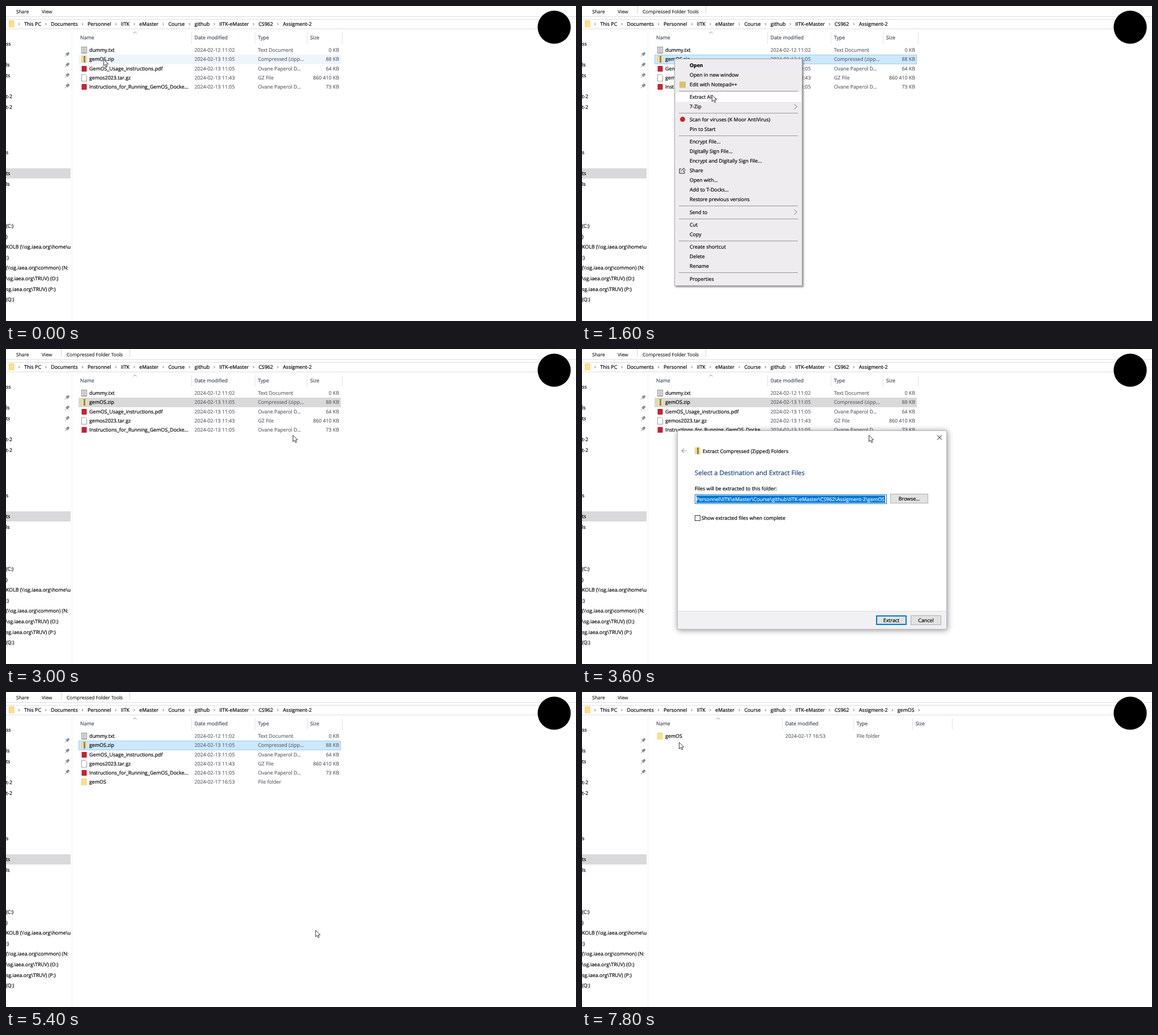
Write an HTML page with a canvas that moves like this. It is 1006x557 px and loops after 8 s.

```html
<!DOCTYPE html>
<html lang="en">
<head>
<meta charset="utf-8">
<title>Extracting an archive</title>
<style>
html, body { margin: 0; width: 100%; height: 100%; overflow: hidden; background: #fff; }
canvas { display: block; }
</style>
</head>
<body>
<canvas id="stage" width="1006" height="557"></canvas>
<script>
const ctx = document.getElementById('stage').getContext('2d');
const LOOP = 8000, STEP = 200;
const INK = '#000', GREY = '#66666c', BLUE = '#0078d7';

// When things happen, in ms
const T = {
  rightClick: 600, menu: 800, extractAll: 1800, menuGone: 2000, blur: 3000, dialog: 3600, dropped: 4000,
  extract: 4800, dialogGone: 5200, folderAdded: 5400, subfolder: 6000, open: 7000, selected: 7200, inside: 7400
};
const during = (t, start, end) => t >= start && t < end;

function text(str, x, y, { color = INK, size = 8.85, align = 'left', weight = 400 } = {}) {
  ctx.font = `${weight} ${size}px "Open Sans", "Noto Sans", sans-serif`;
  ctx.textRendering = 'geometricPrecision';
  ctx.textAlign = align;
  ctx.fillStyle = ctx.strokeStyle = color;
  ctx.lineWidth = 0.2;
  ctx.fillText(str, x, y + size * 0.36);
  ctx.strokeText(str, x, y + size * 0.36);
  return ctx.measureText(str).width;
}

function box(x, y, w, h, fill, stroke, width = 1) {
  if (fill) { ctx.fillStyle = fill; ctx.fillRect(x, y, w, h); }
  if (stroke) {
    ctx.strokeStyle = stroke;
    ctx.lineWidth = width;
    ctx.strokeRect(x + width / 2, y + width / 2, w - width, h - width);
  }
}

const hline = (x, y, w, color) => box(x, y, w, 1, color);
const vline = (x, y, h, color) => box(x, y, 1, h, color);

// Polyline through a flat list of coordinates, relative to (x, y)
function line(x, y, pts, color, width = 1, fill) {
  ctx.beginPath();
  for (let i = 0; i < pts.length; i += 2) ctx.lineTo(x + pts[i], y + pts[i + 1]);
  if (fill) { ctx.closePath(); ctx.fillStyle = fill; ctx.fill(); }
  ctx.strokeStyle = color;
  ctx.lineWidth = width;
  ctx.stroke();
}

function disc(x, y, r, color) {
  ctx.beginPath();
  ctx.arc(x, y, r, 0, 2 * Math.PI);
  ctx.fillStyle = color;
  ctx.fill();
}

function shadowBox(x, y, w, h, fill, stroke, blur, offset) {
  ctx.save();
  ctx.shadowColor = 'rgba(0,0,0,.45)';
  ctx.shadowBlur = blur;
  ctx.shadowOffsetX = ctx.shadowOffsetY = offset;
  box(x, y, w, h, fill);
  ctx.restore();
  box(x, y, w, h, null, stroke);
}

function clipped(x, y, w, h, paint) {
  ctx.save();
  ctx.beginPath();
  ctx.rect(x, y, w, h);
  ctx.clip();
  paint();
  ctx.restore();
}

function chevron(x, y, s = 2, color = '#5c5c60') {
  line(x, y, [-s / 2, -s, s / 2, 0, -s / 2, s], color, 0.9);
}

// Small icons, centred on (x, y)
const icons = {
  page(x, y) { line(x, y, [-4.5, -6, 1.5, -6, 4.5, -3, 4.5, 6, -4.5, 6], '#8e8e92', 0.9, '#fff'); },
  text(x, y) {
    box(x - 5, y - 6, 10, 12, '#f0f0f0', '#8b8b8e');
    for (let i = -4; i <= 4; i += 2) hline(x - 3, y + i, 6, '#a5a5aa');
  },
  folder(x, y) {
    box(x - 5, y - 6, 9, 12, '#f3cf6b');
    box(x - 4, y - 5, 9, 11, '#fbdf8c');
  },
  zip(x, y) {
    icons.folder(x, y);
    box(x - 1, y - 6, 3, 12, '#a8a08a');
    for (let i = -5; i < 6; i += 2) hline(x - 1, y + i, 3, '#6d695e');
  },
  pdf(x, y) { box(x - 4.5, y - 5, 9, 10, '#c8202f'); },
  pin(x, y) {
    line(x, y, [-4, 4, 0, 0], '#858a90');
    line(x, y, [-2.5, -1.5, 1.5, 2.5], '#858a90', 1.5);
    line(x, y, [0, 0, 3, -3], '#858a90', 4);
  }
};

const ROW = 18.57;
const quickAccess = ['ss', '', 'ls', 'ts', '', 't-2', 't-2'];
const places = [
  's', '', 'ts', 'ls', '', '', '', '(C:)', ')', 'KOLB (\\\\sg.iaea.org\\home\\us', ':)',
  '(\\\\sg.iaea.org\\common) (N:', '\\sg.iaea.org\\TRUV) (O:)', 'sg.iaea.org\\TRUV) (P:)', '(Q:)'
];

function drawSidebar() {
  box(0, 287, 114, 18, '#d9d9db');
  vline(116, 44, 513, '#f1f1f1');
  clipped(0, 44, 114, 513, () => {
    quickAccess.forEach((str, i) => text(str, 0, 67 + i * ROW));
    places.forEach((str, i) => text(str, 0, 259 + i * ROW));
  });
  for (let i = 1; i <= 4; i++) icons.pin(108, 67 + i * ROW);
}

const crumbs = 'This PC/Documents/Personnel/IITK/eMaster/Course/github/IITK-eMaster/CS962/Assigment-2'.split('/');

function drawTop(t) {
  const tab = { size: 8.45, color: '#28282c' };
  text('Share', 18, 9.5, tab);
  text('View', 63, 9.5, tab);
  if (during(t, T.rightClick, T.selected)) {
    text('Compressed Folder Tools', 107, 9.5, tab);
    vline(97, 0, 14, '#d5d5d8');
    vline(218, 0, 14, '#d5d5d8');
  }
  hline(0, 18, 1006, '#dededf');
  box(-1, 23, 990, 18, '#fff', '#dcdcde');
  icons.folder(10, 31.5);

  let x = 32;
  chevron(x - 9, 32);
  const trail = t >= T.inside ? [...crumbs, 'gemOS'] : crumbs;
  trail.forEach((str, i) => {
    x += text(str, x, 31.5) + 17.3;
    if (i < trail.length - 1 || t >= T.subfolder) chevron(x - 9, 32);
  });
}

const PDF_TYPE = 'Ovane Paperol D...';
const ZIPPED = '2024-02-13 11:05';
const files = [
  ['text', 'dummy.txt', '2024-02-12 11:02', 'Text Document', '0 KB'],
  ['zip', 'gemOS.zip', ZIPPED, 'Compressed (zipp...', '88 KB'],
  ['pdf', 'GemOS_Usage_instructions.pdf', ZIPPED, PDF_TYPE, '64 KB'],
  ['page', 'gemos2023.tar.gz', '2024-02-13 11:43', 'GZ File', '860 410 KB'],
  ['pdf', 'Instructions_for_Running_GemOS_Docke...', ZIPPED, PDF_TYPE, '73 KB'],
  ['folder', 'gemOS', '2024-02-17 16:53', 'File folder', '']
];
const fileY = i => 78 + i * 16.25;

function drawTable(rows, edges) {
  const columns = [131, ...edges.map(x => x + 5.7)];
  ['Name', 'Date modified', 'Type', 'Size'].forEach((str, i) =>
    text(str, columns[i], 56, { color: '#444b5e' }));
  edges.forEach(x => vline(x, 46, 21, '#e3e3e6'));
  line(128 + (edges[0] - 128) / 2, 47, [-3, 1.5, 0, -1.5, 3, 1.5], '#7c7c80', 0.9);

  rows.forEach(([icon, name, date, type, size], i) => {
    const y = fileY(i);
    icons[icon](138, Math.round(y));
    text(name, 147, y);
    text(date, columns[1], y, { color: GREY });
    text(type, columns[2], y, { color: GREY });
    text(size, 588, y, { color: GREY, align: 'right' });
  });
}

function drawFiles(t) {
  if (t >= T.inside) return drawTable(files.slice(5), [353, 479, 583, 653]);

  const mark = (i, fill, edge) => box(128, Math.round(fileY(i)) - 8, 463, 17, fill, edge);
  const select = i => mark(i, '#cce8ff', '#99cdf5');
  if (t < T.rightClick) mark(1, '#eef5fd');
  else if (during(t, T.blur, T.dialogGone)) mark(1, '#d9d9d9');
  else select(t < T.selected ? 1 : 5);
  if (during(t, T.open, T.selected)) mark(5, '#e5f3ff');
  drawTable(files.slice(0, t >= T.folderAdded ? 6 : 5), [327, 439, 531, 593]);
}

const menu = [
  ['Open', 'Open in new window', 'Edit with Notepad++'],
  ['Extract All...', '7-Zip'],
  ['Scan for viruses (K Moor AntiVirus)', 'Pin to Start'],
  ['Encrypt File...', 'Digitally Sign File...', 'Encrypt and Digitally Sign File...', 'Share',
    'Open with...', 'Add to T-Docks...', 'Restore previous versions'],
  ['Send to'],
  ['Cut', 'Copy'],
  ['Create shortcut', 'Delete', 'Rename'],
  ['Properties']
];
const menuIcons = {
  'Edit with Notepad++': y => box(172, y - 5, 11, 11, '#d9c36a'),
  'Scan for viruses (K Moor AntiVirus)': y => disc(177.5, y, 4.5, '#d01f2e'),
  'Share': y => {
    line(177, y, [-2, -3, -5, -3, -5, 5, 4, 5, 4, 2], INK, 0.9);
    line(177, y, [-2.5, 2, 0, -2, 2, -2, 2, -4.5, 5.5, -1, 2, 2, 2, 0], INK, 0.8);
  },
  '7-Zip': y => chevron(377, y, 4.5),
  'Send to': y => chevron(377, y, 4.5)
};

function drawMenu(pointer) {
  const pitch = 17.05, gap = 5.3;
  shadowBox(163, 93, 226, 402, '#eeecef', '#a5a4a8', 3, 2);
  let y = 104.5;
  menu.forEach((group, g) => {
    if (g) {
      hline(171, Math.round(y - (pitch + gap) / 2), 210, '#98979b');
    }
    for (const str of group) {
      const hover = pointer.x > 166 && Math.abs(y - pointer.y) < pitch / 2;
      if (hover) box(166, y - pitch / 2, 221, pitch, '#fff');
      text(str, 190, y, { weight: str === 'Open' ? 700 : 400 });
      menuIcons[str]?.(y);
      y += pitch;
    }
    y += gap;
  });
}

function button(str, x, y, w, primary) {
  box(x, y, w, 17, '#e2e2e3', primary ? BLUE : '#adadb0', primary ? 2 : 1);
  text(str, x + w / 2, y + 8.5, { align: 'center' });
}

function drawDialog(x, y) {
  ctx.save();
  ctx.translate(x, y);
  shadowBox(0, 0, 476, 352, '#fff', '#b9b5c2', 10, 1);
  box(1, 319, 474, 32, '#f1f0f2');
  hline(1, 319, 474, '#dededf');
  line(12.5, 36, [4.5, 0, -4.5, 0, -0.5, -4, -4.5, 0, -0.5, 4], '#a3a3a8', 1.1);
  icons.zip(36, 36);
  text('Extract Compressed (Zipped) Folders', 45, 36.5);
  for (const s of [-4, 4]) line(463, 12.5, [-4, s, 4, -s], INK);
  text('Select a Destination and Extract Files', 31, 74.5, { size: 11.4, color: '#1d3f7d' });
  text('Files will be extracted to this folder:', 31, 102.5);

  box(31, 113, 339, 17, '#fff', BLUE);
  box(34, 115, 333, 13, BLUE);
  clipped(34, 113, 333, 17, () =>
    text(crumbs.slice(2).concat('gemOS').join('\\'), 366, 121.3, { size: 8.92, color: '#fff', align: 'right' }));

  button('Browse...', 376, 112, 67);
  box(31, 150, 10, 10, '#fff', '#333');
  text('Show extracted files when complete', 43, 155.3);
  button('Extract', 351, 327, 54, true);
  button('Cancel', 412, 327, 54);
  ctx.restore();
}

// Pointer moves: start, end, then where it comes to rest
const moves = [
  [200, T.rightClick, 163, 92], [1000, 1600, 229, 157], [T.extractAll, 2000, 270, 189], [2000, 2400, 506, 152],
  [T.dialog, T.dropped, 566, 136], [T.dropped, 4400, 592, 438], [4400, T.extract, 603, 461],
  [T.dialogGone, 6600, 203, 180], [6600, T.open, 165, 157], [T.selected, 7800, 171, 88.5]
];
const progress = (t, start, end) => Math.max(0, Math.min(1, (t - start) / (end - start)));

function pointerAt(t) {
  let x = 172, y = 94;
  for (const [start, end, toX, toY] of moves) {
    const k = progress(t, start, end);
    x += (toX - x) * k;
    y += (toY - y) * k;
  }
  return { x, y };
}

function drawClick(time, t, rgb) {
  if (!during(t, time, time + 2 * STEP)) return;
  const { x, y } = pointerAt(time);
  disc(x, y + 1, 13, `rgba(${rgb},.55)`);
  ctx.setLineDash([4, 2]);
  ctx.strokeStyle = `rgb(${rgb})`;
  ctx.lineWidth = 1;
  ctx.stroke();
  ctx.setLineDash([]);
}

function draw(t) {
  const pointer = pointerAt(t);
  box(0, 0, 1006, 557, '#fff');
  drawSidebar();
  drawTop(t);
  drawFiles(t);

  if (during(t, T.menu, T.menuGone)) drawMenu(pointer);
  if (during(t, T.menuGone, T.menuGone + STEP)) text('Extract All...', 190, 160.5, { color: '#88868a' });
  if (during(t, T.dialog, T.dialogGone)) {
    const drag = progress(t, T.dialog, T.dropped);
    drawDialog(168 + 60 * drag, 144 - 16 * drag);
  }

  drawClick(T.rightClick, t, '82,74,165');
  for (const time of [T.extractAll, T.extract, T.open]) drawClick(time, t, '228,75,108');

  line(pointer.x + 0.5, pointer.y + 0.5,
    [0, 0, 0, 11.5, 2.7, 9, 4.6, 13.2, 6.4, 12.4, 4.6, 8.4, 8.2, 8.2], '#26242b', 0.9, '#fff');
  disc(967.5, 37.5, 29.2, '#000');
}

function frame(now) {
  draw(Math.floor(now % LOOP / STEP) * STEP);
  requestAnimationFrame(frame);
}
requestAnimationFrame(frame);
</script>
</body>
</html>
```
